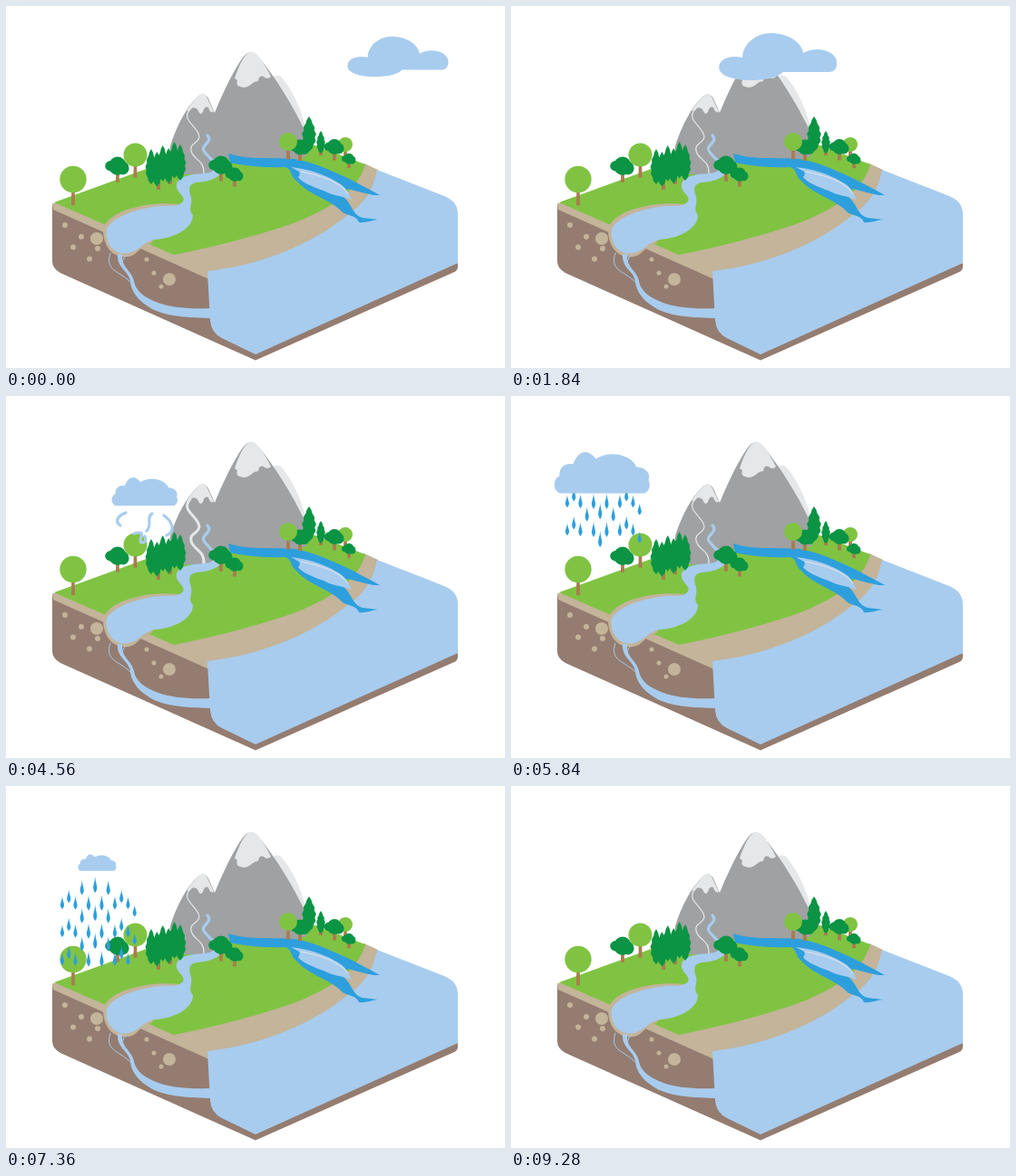
These frames come from a looping animation (550 px wide and 400 px high, 9400 ms). An HTML page:

```html
<!DOCTYPE html>
<html lang="en">
<head>
<meta charset="utf-8">
<title>Water cycle</title>
<style>
html, body { margin: 0; width: 100%; height: 100%; overflow: hidden; background: #fff; }
svg { display: block; width: 100vw; height: 100vh; }
.water { fill: #a8ccee; }
.river { fill: #2d9fdd; }
.grass { fill: #80c342; }
.sand { fill: #c3b49a; }
.soil { fill: #947c70; }
.rock { fill: #9fa1a2; }
.snow { fill: #e6e7e8; }
.pine { fill: #0a9444; }
.trunk { fill: #a97c50; }
.line { fill: none; stroke: #e6e7e8; stroke-linecap: round; }
.flow { fill: none; stroke: #a8ccee; stroke-width: 3.2; stroke-linecap: round; }
</style>
</head>
<body>
<svg viewBox="0 0 550 400">
  <!-- ground block -->
  <path class="soil" d="M51,220 L224,295 L300,340 L498,284 V288 Q498,292 494,294 L275,391.5 L60,295 Q51,290 51,282Z"/>
  <path class="sand" d="M51,218 L395,174 L410,181 L412,215 L300,290 L224,302 L52,225Z"/>
  <path class="water" d="M409,181 L483,210 Q498,216 498,230 V284 L275,385 L238,367 Q226,361 225,347 L222,293 C278,287 336,264 374,233 C394,219 404,206 409,181Z"/>
  <path class="grass" d="M53,217 L182,170 L330,150 L396,175 C387,206 357,223 322,238 C284,252 234,265 185,275Z"/>

  <!-- mountains -->
  <path class="snow" d="M288,84 Q297,73 303,78 C315,92 325,112 331,137 L318,145Z"/>
  <path class="rock" d="M178,186 L181,155 C186,138 198,112 210,102 Q217,93 223,102 L230,118 C239,96 251,71 261,57 Q270,45 279,57 C297,79 315,108 329,137 L331,166 L314,171 L247,167 L232,186Z"/>
  <path class="snow" d="M252,80 C256,68 260,60 263,56 Q270,46 277,54 C283,61 288,70 292,78 Q288,82 284,78 Q279,76 278,83 Q274,83 271,86 Q264,92 258,89 Q253,88 255,82Z"/>
  <path class="snow" d="M199,116 C204,108 209,103 213,99 Q218,94 222,102 L229,117 Q225,119 223,112 Q219,110 217,117 Q214,122 211,114 Q206,110 203,115Z"/>
  <path id="meltL" class="line" d="M203,114 C192,126 211,132 213,144 C213,152 202,151 204,160 C206,170 219,170 218,185"/>
  <path id="meltR" class="line" pathLength="1" stroke-dasharray="1 2" d="M272,81 C275,101 304,108 306,128 C307,148 290,160 278,165"/>

  <!-- lake and rivers -->
  <path class="sand" d="M190,219 C160,215 111,225 107,247 C107,266 118,279 134,277 C146,276 145,266 160,262Z"/>
  <path class="water" d="M185,221 C160,219 119,230 111,246 C108,265 122,276 135,273 C150,269 149,261 165,258 C188,256 206,245 206,231 C200,224 206,220 204,211 C201,202 201,197 210,195 C224,194 237,190 239,179 L230,178 C229,187 214,184 202,187 C189,189 184,198 191,206 C198,213 198,218 185,221Z"/>
  <path class="flow" d="M222,143 C229,150 214,154 218,160 C223,168 232,171 232,183"/>
  <path class="river" d="M245,163 C265,170 295,167 318,169 C336,172 352,179 372,188 C385,194 399,202 412,209 C402,210 387,204 376,202 L373,212 C382,220 382,231 393,234 L410,236 C402,237 396,240 389,239 C386,230 373,232 369,226 C357,214 333,208 321,194 C312,187 316,181 308,178 C285,179 264,177 247,173Z"/>
  <path class="water" d="M314,178 C333,180 351,186 364,194 C374,199 377,205 381,214 C368,209 361,210 350,204 C338,200 325,194 322,189 Q325,186 323,183Z"/>
  <path class="line" d="M325,183 C345,187 367,193 377,207"/>

  <!-- underground stream -->
  <g id="stones"></g>
  <path id="seep" class="water" stroke="#a8ccee" d="M123,274 C122,290 135,292 137,304 C138,318 150,330 166,337 C182,344 205,344 225,345 L225,334 C200,335 182,333 168,328 C152,322 143,315 141,304 C139,292 127,290 128,274Z"/>
  <path class="flow" style="stroke-width:1" d="M115,273 C108,293 126,293 137,305 M133,275 Q126,280 129,290"/>

  <g id="trees"></g>
  <g id="seaVapour" class="flow">
    <path d="M411,83 C402,85 394,90 401,95"/>
    <path d="M417,93 C430,91 415,102 427,107"/>
    <path d="M437,84 C430,87 438,92 432,96"/>
    <path d="M451,84 C464,89 463,102 449,102"/>
  </g>
  <g id="treeVapour" class="flow">
    <path d="M132,129 C124,132 119,138 126,143"/>
    <path d="M141,152 C157,148 145,157 149,162 Q156,162 153,155"/>
    <path d="M161,130 C154,134 162,142 155,149"/>
    <path d="M174,132 C184,139 187,150 177,154"/>
  </g>
  <g id="flakes" fill="#fff"></g>
  <g id="rain"></g>
  <path id="seaCloud" class="water" d="M-29,26 C-52,26 -65,20 -65,12 C-65,2 -52,-2 -39,1 C-39,-14 -24,-26 -8,-26 C11,-26 26,-16 28,-4 C40,-12 65,-8 65,7 C65,14 61,17 56,17 H5 C2,22 -12,26 -29,26Z"/>
  <path id="rainCloud" class="water" d="M-47,23 C-56,18 -53,6 -47,4 C-48,-6 -40,-11 -32,-9 C-28,-21 -18,-29 -7,-15 C8,-25 32,-20 38,-6 C48,-6 54,2 51,8 Q55,18 47,23Z"/>
</svg>
<script>
const LOOP = 9400, STEP = 40, LAST = 9280;
const $ = id => document.getElementById(id);

function add(parent, tag, attrs) {
  const el = document.createElementNS('http://www.w3.org/2000/svg', tag);
  for (const k in attrs) el.setAttribute(k, attrs[k]);
  return parent.appendChild(el);
}
const oval = (g, cls, cx, cy, rx, ry = rx) => add(g, 'ellipse', { class: cls, cx, cy, rx, ry });
const clamp = v => Math.max(0, Math.min(1, v));
const ramp = (t, a, b) => clamp((t - a) / (b - a));
const ease = u => u * u * (3 - 2 * u);
const mix = (a, b, u) => a + (b - a) * u;
const pulse = (t, a, b) => Math.sin(Math.PI * ramp(t, a, b));

let seed = 11;
const random = () => (seed = seed * 16807 % 2147483647) / 2147483647;

// stones
const stone = (x, y, r) => oval($('stones'), 'sand', x, y, r);
stone(100, 257, 7);
stone(180, 302, 7);
for (let i = 0; i < 5; i++) stone(65 + 9 * i, 242 + 6.5 * i + i % 2 * 18, 3);
for (let i = 0; i < 3; i++) stone(155 + 8 * i, 280 + 15 * i, 2.5);

// trees
const trees = $('trees');
const trunk = (x, y, foot) => add(trees, 'path', { class: 'trunk',
  d: `M${x - 1.6},${y} h3.2 L${x + 2},${foot} h-4Z` });

function ball(x, y, r) {
  trunk(x, y, y + r * 1.95);
  oval(trees, 'grass', x, y, r);
}

function bush(x, y, r) {
  trunk(x, y, y + r * 1.4);
  oval(trees, 'pine', x, y - r * 0.1, r * 0.8, r * 0.85);
  oval(trees, 'pine', x - r * 0.55, y - r * 0.1, r * 0.6, r * 0.5);
  oval(trees, 'pine', x + r * 0.5, y + r * 0.1, r * 0.55, r * 0.6);
}

// ragged outline: wide below the middle, with teeth down each side
function pine(x, top, foot, width) {
  const teeth = 10, left = [], right = [];
  for (let i = 0; i <= teeth; i++) {
    const u = i / teeth;
    const half = width / 2 * Math.sin(Math.PI * u ** 1.2) ** 0.7 * (i % 2 ? 1 : 0.8);
    const y = mix(top, foot, u);
    left.unshift(`${x - half},${y}`);
    right.push(`${x + half},${y}`);
  }
  add(trees, 'polygon', { class: 'pine', points: [...right, ...left].join(' ') });
}

ball(74, 191.5, 14.7);
bush(123, 178, 12);
ball(142.5, 164.5, 13);
trunk(168, 180, 203);
trunk(181, 180, 197);
for (let i = 0; i < 6; i++) {
  const x = 160 + 6.4 * i;
  pine(x, 158 - 2 * i + i % 2 * 5, 197 - 1.6 * i + i % 2 * 4, 13);
}
bush(237, 177, 12);
bush(252, 187, 9);
bush(324, 157, 10);
ball(311, 150, 10);
pine(334, 122, 161, 16);
trunk(347, 155, 165);
pine(347, 138, 163, 10);
ball(374, 153, 8);
bush(362, 156.5, 10);
bush(378, 169.5, 7);

// rain: even columns level, odd ones in an arc; y is the place at 7360 ms
const GAP = 31, FALL = 0.09, SKY = 92, LAND = 196, COLUMNS = 12;
const drops = [];
for (let i = 0; i < COLUMNS; i++) {
  const x = 62 + 7.25 * i;
  const tall = 1.3 - 0.06 * Math.abs(i - 5);
  const top = i % 2 ? 109 + 0.8 * (i - 5) ** 2 : 129;
  for (let y = top; y < 296; y += GAP) {
    const el = add($('rain'), 'path', { class: 'river',
      d: 'M0,-7 C.5,-2 2.1,0 2.1,3 Q1.8,5 0,7 Q-1.8,5 -2.1,3 C-2.1,0 -.5,-2 0,-7Z' });
    drops.push({ el, x, y, tall });
  }
}

// snow
const flakes = Array.from({ length: 9 }, () => ({
  el: oval($('flakes'), '', mix(250, 290, random()), 0, mix(1.5, 3.6, random())),
  shift: random() * 30
}));

function place(el, x, y, s) {
  el.setAttribute('transform', `translate(${x} ${y}) scale(${s})`);
  el.setAttribute('visibility', s > 0.01 ? 'visible' : 'hidden');
}

function rise(el, dy, alpha) {
  el.setAttribute('transform', `translate(0 ${dy})`);
  el.setAttribute('opacity', alpha);
}

function draw(t) {
  // sea cloud: grow, drift to the peak, snow out
  const drift = ease(ramp(t, 1160, 2120));
  const sea = t < 2120 ? mix(0.855, 1, ramp(t, 0, 960))
    : mix(1, 0.925, ramp(t, 2120, 2920)) * (1 - ramp(t, 2920, 3800));
  place($('seaCloud'), mix(432, 258.5, drift), 56, sea);
  rise($('seaVapour'), (960 - t) * 0.09, ramp(t, 0, 320) * (1 - ramp(t, 1000, 1200)));

  $('flakes').setAttribute('opacity', ramp(t, 2120, 2400) * (1 - ramp(t, 3300, 3700)));
  for (const { el, shift } of flakes) el.setAttribute('cy', 68 + (t * 0.03 + shift) % 30);

  // melt water
  const melt = $('meltR');
  melt.setAttribute('stroke-dashoffset', 1 - ramp(t, 2240, 2680));
  melt.setAttribute('stroke-width', 1.2 + 2 * pulse(t, 2680, 3840));
  melt.setAttribute('opacity', t > 2240 ? 1 - ramp(t, 3840, 4160) : 0);
  $('meltL').setAttribute('stroke-width', 1.2 + 1.8 * pulse(t, 3880, 5200));

  // rain cloud: gather over the trees, move left, rain out
  const move = ease(ramp(t, 4800, 5760));
  const size = mix(0.69, 1, move) * ramp(t, 3880, 4480) * (1 - ramp(t, 6760, 7760));
  place($('rainCloud'), mix(153, 100.5, move), mix(105.5, 84.5, move), size);
  rise($('treeVapour'), (4560 - t) * 0.05, ramp(t, 3920, 4200) * (1 - ramp(t, 4640, 4880)));

  for (const { el, x, y, tall } of drops) {
    const now = y + (t - 7360) * FALL;
    el.setAttribute('transform', `translate(${x} ${now}) scale(1 ${tall})`);
    el.setAttribute('visibility', now > SKY && now < LAND ? 'visible' : 'hidden');
  }

  // water seeping underground
  $('seep').setAttribute('stroke-width', 9 * pulse(t, 7800, 9240));
}

let start;
function tick(now) {
  start ??= now;
  const t = Math.floor((now - start) % LOOP / STEP) * STEP;
  draw(Math.min(t, LAST));
  requestAnimationFrame(tick);
}
requestAnimationFrame(tick);
</script>
</body>
</html>
```
